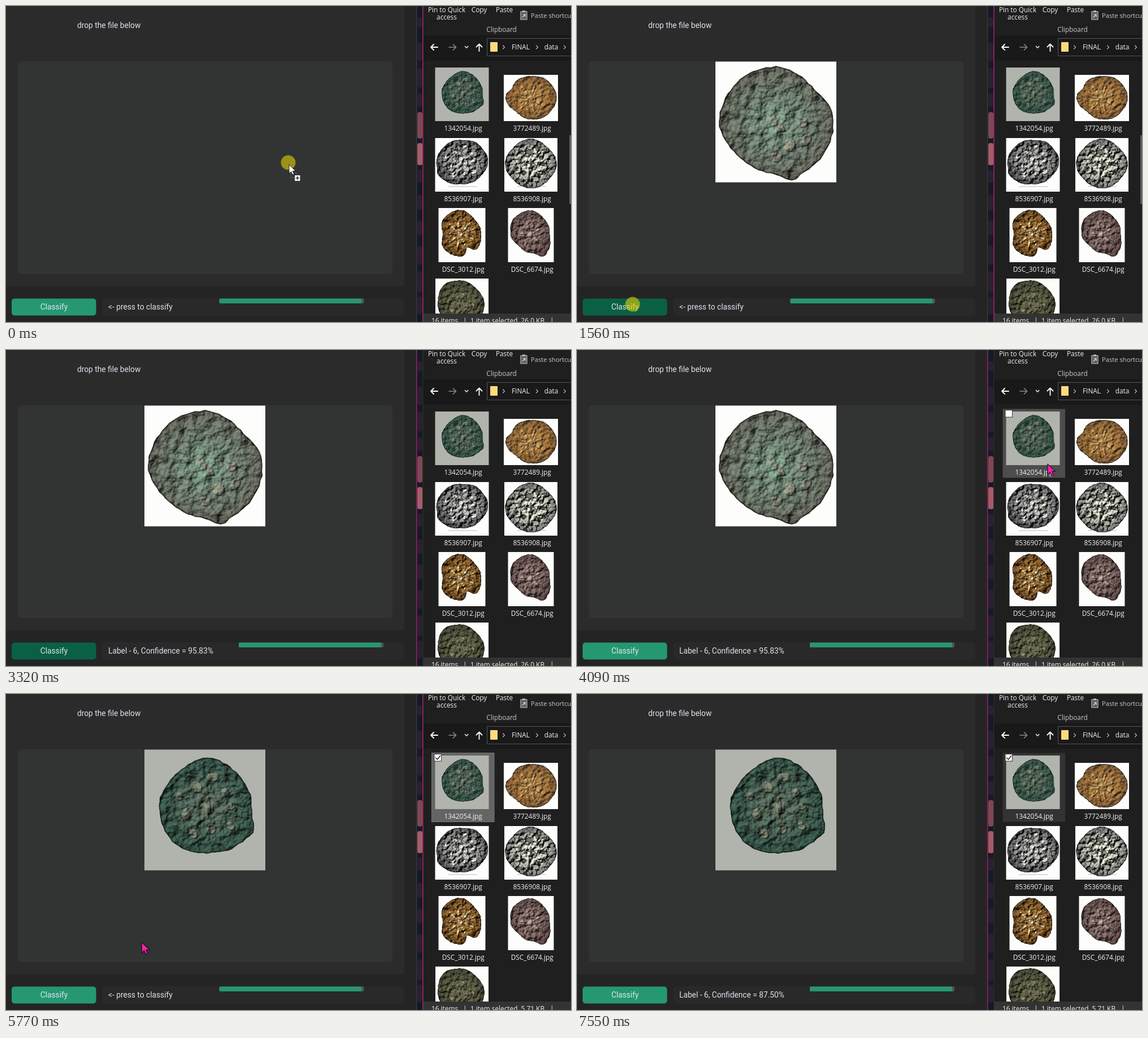
Write an HTML page that moves like this. It is 1000 px wide and 560 px high and loops after 8000 ms.

```html
<!DOCTYPE html>
<html lang="en">
<head>
<meta charset="utf-8">
<title>Coin classifier</title>
<style>
html, body { margin: 0; width: 100%; height: 100%; overflow: hidden; background: #242424; }
svg { display: block; width: 1000px; height: 560px; }
.app { font: 13.75px Roboto, sans-serif; fill: #dce4ee; }
.exp { font: 11.85px "Open Sans", "Noto Sans", sans-serif; fill: #f2f2f2; }
.mid { text-anchor: middle; }
.line { fill: none; stroke-linecap: round; stroke-linejoin: round; }
</style>
</head>
<body>
<svg id="stage" viewBox="0 0 1000 560"></svg>
<script>
const LOOP = 8000;
const stage = document.getElementById('stage');

// radii: distance from the centre to the rim every 45 degrees, clockwise from the right
// nub: [angle, height] of one bulge or chip on the rim
const coins = {
  rust: { size: [100, 100], mid: [50, 50], radii: [48, 48, 43, 42, 47, 46, 46, 42], nub: [75, 6],
    tones: ['#75937e', '#69776a', '#5d5a50'], light: '#8b8e7c', rough: 2.5, dots: 4, spread: 120, rod: -45 },
  green: { size: [100, 100], mid: [52, 47], radii: [37, 41, 39, 41, 40, 37, 40, 37], nub: [28, 4], back: '#b1b4ad',
    tones: ['#5c6a5c', '#445b4f', '#2b4c40'], light: '#747c69', rough: 3, dots: 9, rod: 0 },
  amber: { size: [96, 82], mid: [48, 41], radii: [46, 42, 38, 36, 45, 40, 39, 43], nub: [205, -4],
    tones: ['#b48a53', '#9b6f3a', '#6f5334'], light: '#c3a06c', rough: 3, rays: 7 },
  silver: { size: [95, 95], mid: [47, 42], radii: [47, 42, 40, 45, 45, 41, 39, 43], nub: [152, 3], foot: 1,
    tones: ['#b9bab4', '#8e8f8d', '#3b3d40'], light: '#d5d5cc', rough: 7, dots: 9, rod: 20 },
  pale: { size: [94, 95], mid: [47, 45], radii: [46, 43, 44, 43, 46, 42, 44, 41], nub: [70, 1], foot: 1,
    tones: ['#deddcc', '#b3b3a8', '#454747'], light: '#62645f', rough: 7, dots: 11, rod: 0 },
  gold: { size: [83, 96], mid: [38, 46], radii: [38, 41, 40, 39, 31, 40, 43, 37], nub: [62, -14],
    tones: ['#ad8145', '#8f652f', '#5f4120'], light: '#e2cda2', rough: 5, rays: 9 },
  plum: { size: [81, 96], mid: [39, 46], radii: [35, 43, 34, 29, 35, 40, 42, 37], nub: [60, 6],
    tones: ['#86706c', '#755f5b', '#54423f'], light: '#b09b95', rough: 4, rays: 5 },
  olive: { size: [94, 96], mid: [46, 45], radii: [41, 41, 38, 41, 42, 45, 42, 38], nub: [230, 1],
    tones: ['#69684f', '#57573f', '#3a3b2e'], light: '#85836b', rough: 4, dots: 5, rod: -50 }
};

const rect = (x, y, w, h, fill, more = '') =>
  `<rect x="${x}" y="${y}" width="${w}" height="${h}" fill="${fill}" ${more}/>`;
const text = (x, y, s, cls = 'exp mid', more = '') =>
  `<text x="${x}" y="${y}" class="${cls}" ${more}>${s}</text>`;
const line = (d, color, width = 1.5) =>
  `<path class="line" d="${d}" stroke="${color}" stroke-width="${width}"/>`;
const polar = ([x, y], r, deg) =>
  [x + r * Math.cos(deg * Math.PI / 180), y + r * Math.sin(deg * Math.PI / 180)];

function random(seed) {
  return () => (seed = (seed * 16807) % 2147483647) / 2147483647;
}

function rim({ mid, radii, nub: [at, height] }, rnd) {
  const pts = [];
  for (let a = 0; a < 360; a += 5) {
    const i = Math.floor(a / 45), k = (1 - Math.cos((a % 45) / 45 * Math.PI)) / 2;
    const r = radii[i] + (radii[(i + 1) % 8] - radii[i]) * k;
    const bulge = height * Math.exp(-(((a - at) / 11) ** 2));
    pts.push(polar(mid, r + bulge + rnd() - .5, a).map(v => v.toFixed(1)));
  }
  return `M${pts.join('L')}Z`;
}

// Raised marks: a rod within a ring of dots, or a star of rays
function relief({ mid, radii, light, dots = 0, spread = 360, rod, rays = 0 }, rnd) {
  const r = radii.reduce((a, b) => a + b) / 8;
  const bump = (x, y, rx, ry, turn) => [['#15130f', .55, 1.2], [light, .85, 0]].map(([fill, o, d]) =>
    `<ellipse rx="${rx}" ry="${ry}" fill="${fill}" opacity="${o}" transform="translate(${x + d} ${y + d}) rotate(${turn})"/>`).join('');
  let out = '';
  for (let i = 0; i < dots; i++) {
    const [x, y] = polar(mid, r * (.48 + .16 * (i % 2)), i * spread / dots);
    out += bump(x, y, r * (.07 + rnd() * .06), r * (.06 + rnd() * .05), rnd() * 180);
  }
  if (dots) out += bump(...mid, r * .05, r * .22, rod);
  for (let i = 0; i < rays; i++) {
    const a = i * 360 / rays + 180 + rnd() * 12;
    const [x, y] = polar(mid, r * .42, a);
    out += bump(x, y, r * (.18 + rnd() * .1), r * .04, a);
  }
  if (rays) out += bump(...mid, r * .1, r * .1, 0);
  return out;
}

function coin(id, c, seed) {
  const rnd = random(seed * 7919 + 11), d = rim(c, rnd), [w, h] = c.size;
  const stops = c.tones.map((t, i) => `<stop offset="${i * .5}" stop-color="${t}"/>`).join('');
  return `<radialGradient id="${id}-tone" r=".56">${stops}</radialGradient>
    <clipPath id="${id}-clip"><path d="${d}"/></clipPath>
    <filter id="${id}-worn" x="0" y="0" width="1" height="1" color-interpolation-filters="sRGB">
      <feTurbulence type="fractalNoise" baseFrequency=".13" numOctaves="3" seed="${seed}"/>
      <feDiffuseLighting surfaceScale="${c.rough}" lighting-color="#fff"><feDistantLight azimuth="225" elevation="50"/></feDiffuseLighting>
      <feComposite in2="SourceGraphic" operator="arithmetic" k1="1.3"/>
      <feComposite in2="SourceGraphic" operator="in"/>
    </filter>
    <g id="${id}">${rect(0, 0, w, h, c.back || '#fdfdfc')}
      ${c.foot ? rect(w * .24, h - 9.5, w * .54, 1, '#bbb') : ''}
      <g filter="url(#${id}-worn)"><g clip-path="url(#${id}-clip)">
        <path d="${d}" fill="url(#${id}-tone)"/>${relief(c, rnd)}
        <path d="${d}" fill="none" stroke="#1b1a17" stroke-width="2.4" opacity=".6"/>
      </g></g></g>`;
}

const place = (id, x, y, sx = 1, sy = sx) =>
  `<use href="#${id}" transform="translate(${x} ${y}) scale(${sx} ${sy})"/>`;

const files = [['green', '1342054'], ['amber', '3772489'], ['silver', '8536907'],
  ['pale', '8536908'], ['gold', 'DSC_3012'], ['plum', 'DSC_6674'], ['olive', '']];

// Two columns; each picture stands on the bottom of its cell
function file([id, name], i) {
  const x = 808 + i % 2 * 122, y = 204 + Math.floor(i / 2) * 125;
  const k = id === 'green' ? .95 : 1, [w, h] = coins[id].size;
  return place(id, x - 1 - w * k / 2, y - h * k + (id === 'olive' ? 0 : 0), k) +
    (name && text(x + 1.2, y + 17, name + '.jpg'));
}

const gt = x => line(`M${x - 1.5} 70l3 3-3 3`, '#b5b5b5', 1.2);
const defs = Object.entries(coins).map(([id, c], i) => coin(id, c, i + 1)).join('');

const app = `
  ${rect(0, 0, 727, 560, '#242424')}
  ${rect(-10, -10, 715, 507, '#2b2b2b', 'rx="6"')}
  ${rect(21, 98, 663, 377, '#323333', 'rx="6"')}
  ${rect(170, 518, 535, 31, '#292929', 'rx="6"')}
  ${text(126, 39, 'drop the file below', 'app')}
  <g id="shotA">${place('rust', 245, 98.5, 2.14)}</g>
  <g id="shotB">${place('green', 245, 98.5, 2.14)}</g>
  ${rect(10, 518.5, 149.5, 30, '#259871', 'rx="5" id="button"')}
  ${text(85, 538, 'Classify', 'app mid')}
  ${text(181, 538, '', 'app', 'id="label"')}
  <g id="bar">${rect(0, 518.5, 256, 8.5, '#51565a', 'rx="2"')}${rect(0, 518.5, 252, 8.5, '#27966f', 'rx="2"')}</g>`;

function wallpaper() {
  const rnd = random(5);
  let out = rect(727, 0, 11, 560, '#151a25');
  for (let y = 20; y < 560; y += 45) out += rect(728, y, 9, 18 + rnd() * 22, '#2a2030', 'rx="4"');
  return out + rect(728, 188, 9, 47, '#7d4853', 'rx="4"') + rect(728, 243, 9, 39, '#a55c68', 'rx="3"');
}

const explorer = `
  ${rect(738, 0, 262, 560, '#1f1f1f')}${rect(738, 52, 262, 45, '#191919')}
  ${text(780, 10.5, 'Pin to Quick')}${text(780, 24, 'access')}
  ${text(837.5, 10.5, 'Copy')}${text(882, 10.5, 'Paste')}
  ${text(929, 21, 'Paste shortcut', 'exp', 'style="font-size:11.2px;fill:#ccc"')}
  ${text(877, 46, 'Clipboard', 'exp mid', 'style="fill:#c9c9c9"')}
  ${rect(911, 10, 11, 14, '#5c5c5c', 'stroke="#a5a5a5" stroke-width="1.4"')}${rect(914, 8, 5, 3, '#b5b5b5')}
  ${line('M914 20l5-5m-4 0h4v4', '#ddd', 1.2)}
  ${line('M764 73H752.5M757 68l-5 5 5 5', '#fff', 1.8)}
  ${line('M784 73h12M791.5 68l5 5-5 5', '#8a8a8a', 1.6)}
  ${line('M812.5 71.5l2.7 2.7 2.7-2.7', '#ddd', 1.7)}
  ${line('M837.5 80V67.5M832.5 72.5l5-5 5 5', '#fff', 1.8)}
  ${rect(851.5, 57.5, 160, 31, '#191919', 'stroke="#555"')}
  ${rect(857, 64, 13, 17, '#ffda7c', 'rx="1"')}
  ${gt(881)}${gt(940)}${gt(989)}
  ${text(911, 77, 'FINAL')}${text(965, 77, 'data')}
  ${rect(753.5, 104.5, 110.5, 122, '#4d4d4d', 'id="pick"')}
  ${files.map(file).join('')}
  <g id="check">${rect(758, 106.5, 12.5, 12.5, '#fff', 'stroke="#333"')}<g id="tick">${line('M760.5 113l3 3 5-6.5', '#222', 1.4)}</g></g>
  ${rect(738, 545, 262, 15, '#333')}
  ${text(753, 562, '16 items', 'exp')}${text(809, 562, '|', 'exp')}
  ${text(822, 562, '', 'exp', 'id="size"')}${text(963, 562, '|', 'exp')}
  ${rect(997, 229, 3, 122, '#5c5c5c', 'id="thumb"')}
  ${rect(726, 0, 1.4, 560, '#444', 'id="appEdge"')}
  ${rect(737, 0, 1.6, 560, '#a0246f', 'id="expEdge"')}`;

const pointer = `
  <g id="ghost" opacity=".8">${rect(-47, -109, 110, 110, '#8ea0ac', 'opacity=".62"')}${place('green', -41, -103, .95)}</g>
  <g id="cursor">
    <circle id="ring" cx="-1.5" cy="-3.5" r="13" fill="#dccd0a" opacity=".62"/>
    <g id="plus">${rect(3, 14.5, 10, 9, 'none', 'stroke="#777" stroke-dasharray="2 1.5"')}
      ${rect(9.5, 18.5, 10.5, 11, '#fff', 'stroke="#222"')}${line('M12 24h5.5M14.75 21.25v5.5', '#111', 1.3)}</g>
    <path id="arrow" d="M0 0V17.5L4 13.8L6.8 20L9.7 18.7L7 12.6H12.6Z" stroke="#111" stroke-linejoin="round"/>
  </g>`;

stage.innerHTML = `<defs>${defs}</defs>${app}${wallpaper()}${explorer}${pointer}`;

const el = {};
stage.querySelectorAll('[id]').forEach(n => el[n.id] = n);
const set = (n, o) => { for (const k in o) n.setAttribute(k, o[k]); };
const show = (n, on) => set(n, { display: on ? 'inline' : 'none' });

// Steps: [time, value]; the last one reached holds
const at = (steps, t) => steps.reduce((v, s) => t >= s[0] ? s[1] : v, null);

// Pointer stops: [arrive, leave, x, y]
const stops = [[0, 0, 502, 281], [90, 760, 412, 275], [1150, 3460, 100, 532],
  [4090, 5100, 833, 202], [5380, 5590, 506, 272], [5870, LOOP, 95, 532]];
const hover = [[0, 0], [1130, 1], [3490, 0], [5850, 1], [7500, 0]];
const cursor = [[0, 'drag'], [300, 'free'], [1190, 'none'], [1560, 'press'], [1680, 'none'], [3460, 'free'],
  [4400, 'hold'], [5100, 'ghost'], [5220, 'drag'], [5540, 'free'], [5900, 'none'], [6440, 'press'], [6560, 'none']];
const image = [[0, ''], [330, 'A'], [5570, 'B']];
const result = [[0, ''], [2960, '95.83'], [5570, ''], [7230, '87.50']];
const front = [[0, 1], [1620, 0], [4400, 1], [6500, 0]];
const item = [[0, ''], [4060, 'over'], [4400, 'on'], [6500, 'off']];
const itemFill = { over: '#4d4d4d', on: '#646464', off: '#333' };

function locate(t) {
  const i = stops.findLastIndex(s => s[0] <= t), [, leave, x, y] = stops[i];
  if (t <= leave) return [x, y];
  const [arrive, , nx, ny] = stops[i + 1], k = (t - leave) / (arrive - leave);
  return [x + (nx - x) * k, y + (ny - y) * k];
}

function draw(t) {
  const img = at(image, t), score = at(result, t), inFront = at(front, t);
  const pick = at(item, t), mode = at(cursor, t), drag = mode === 'drag';
  show(el.shotA, img === 'A');
  show(el.shotB, img === 'B');
  set(el.button, { fill: at(hover, t) ? '#0a6044' : '#259871' });
  el.label.textContent = score ? `Label - 6, Confidence = ${score}%` : '<- press to classify';
  set(el.bar, { transform: `translate(${score ? 412 : 377.5} 0)` });
  set(el.appEdge, { fill: inFront ? '#3a3a40' : '#a0246f' });
  set(el.expEdge, { fill: inFront ? '#a0246f' : '#2a2a2e' });
  show(el.thumb, t < 1620);
  show(el.pick, pick);
  set(el.pick, { fill: itemFill[pick] || 'none', stroke: pick === 'on' ? '#777' : 'none' });
  show(el.check, pick);
  show(el.tick, pick && pick !== 'over');
  el.size.textContent = `1 item selected\u00a0 ${t < 4400 ? '26.0' : '5.71'} KB`;

  const [x, y] = locate(t), move = `translate(${x.toFixed(1)} ${y.toFixed(1)})`;
  set(el.cursor, { transform: move });
  set(el.ghost, { transform: move });
  show(el.cursor, mode !== 'none');
  show(el.ghost, mode === 'ghost');
  show(el.ring, mode !== 'free');
  show(el.plus, drag);
  show(el.arrow, mode !== 'press');
  set(el.arrow, { fill: drag ? '#fff' : mode === 'ghost' ? '#d92b78' : '#ff1fb0', transform: `scale(${drag ? .92 : 1.06})` });
}

const start = performance.now();
function tick(now) {
  draw(Math.max(0, now - start) % LOOP);
  requestAnimationFrame(tick);
}
draw(0);
requestAnimationFrame(tick);
</script>
</body>
</html>
```
